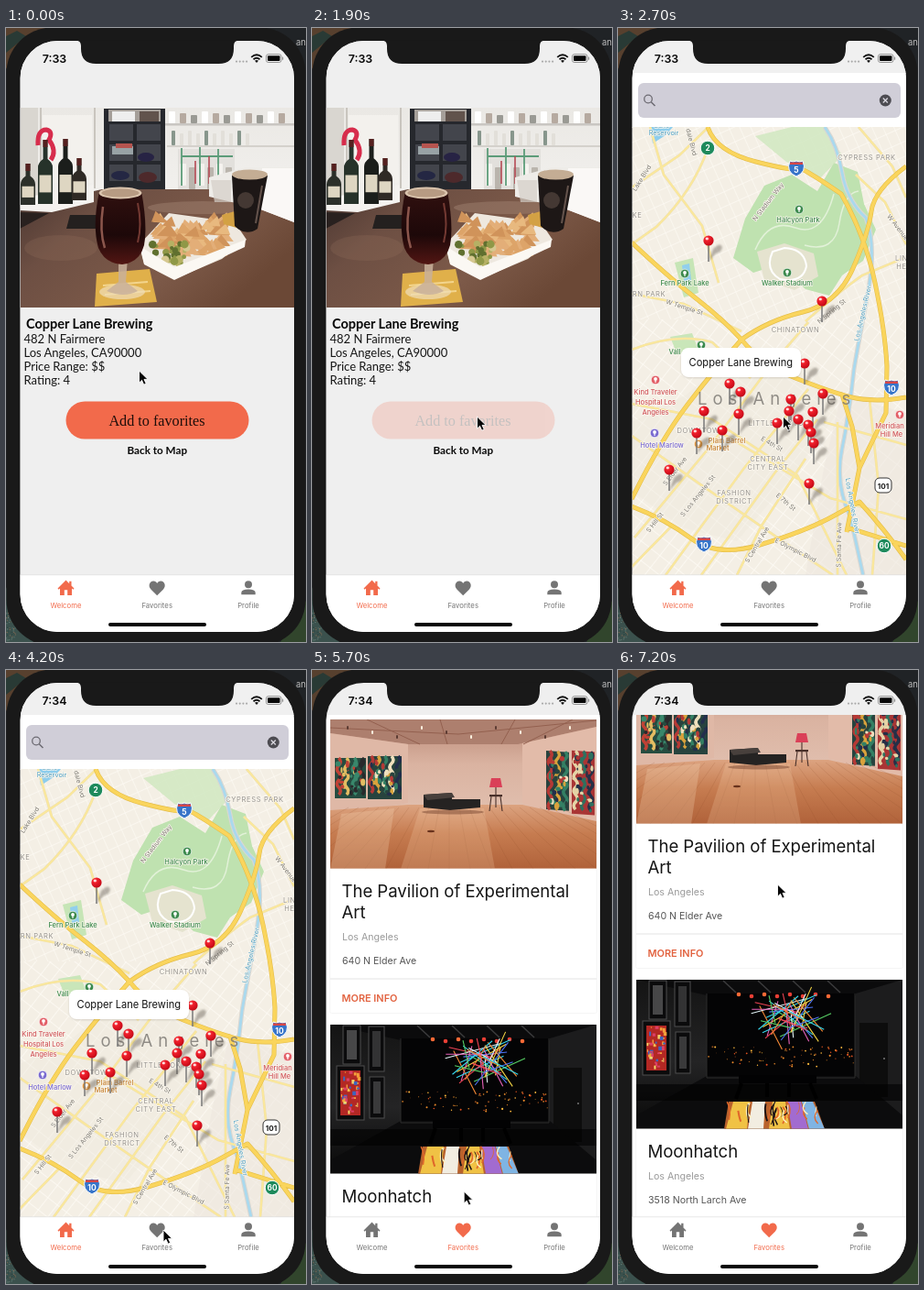
Write an HTML page that moves like this. It is 328 by 670 pixels and loops after 7300 ms.

```html
<!DOCTYPE html>
<html lang="en">
<head>
<meta charset="utf-8">
<title>City guide app</title>
<style>
html,body{margin:0;width:100%;height:100%;overflow:hidden;background:#1a1a1a}
svg{display:block;width:328px;height:670px;font-family:Inter,Roboto,sans-serif}
</style>
</head>
<body>
<script>
const LOOP = 7300, ORANGE = '#f26a4b', GREY = '#747474';

// markup helpers
const R = (x, y, w, h, f, rx = 0, o = '') => `<rect x="${x}" y="${y}" width="${w}" height="${h}" rx="${rx}" fill="${f}" ${o}/>`;
const C = (x, y, r, f, o = '') => `<circle cx="${x}" cy="${y}" r="${r}" fill="${f}" ${o}/>`;
const E = (x, y, a, b, f, o = '') => `<ellipse cx="${x}" cy="${y}" rx="${a}" ry="${b}" fill="${f}" ${o}/>`;
const P = (d, f, o = '') => `<path d="${d}" fill="${f}" ${o}/>`;
const S = (d, c, w = 1, o = '') => `<path d="${d}" fill="none" stroke="${c}" stroke-width="${w}" ${o}/>`;
const T = (s, x, y, z, f = '#111', o = '') => `<text x="${x}" y="${y}" font-size="${z}" fill="${f}" ${o}>${s}</text>`;
const G = (id, body, o = '') => `<g id="${id}" ${o}>${body}</g>`;
const many = (n, fn) => Array.from({length: n}, (_, i) => fn(i)).join('');
const grad = (id, stops, o = 'x2="0" y2="1"') => `<linearGradient id="${id}" ${o}>` +
  stops.map(([p, c]) => `<stop offset="${p}" stop-color="${c}"/>`).join('') + '</linearGradient>';
const clip = (id, body) => `<clipPath id="${id}">${body}</clipPath>`;
const MID = 'text-anchor="middle"';

let seed = 11;
const rnd = (a = 0, b = 1) => {
  seed = (seed * 16807) % 2147483647;
  return +(a + (b - a) * seed / 2147483647).toFixed(1);
};
const pick = list => list[Math.floor(rnd(0, 99.9) / 100 * list.length)];

const defs = '<defs>' +
  clip('screen', R(15.5, 14, 299.5, 645, '#000', 41)) +
  clip('body', R(15.5, 14, 299.5, 583, '#000')) +
  clip('list', R(15.5, 49, 299.5, 548, '#000')) +
  clip('photo', R(15.5, 87, 299.5, 218, '#000')) +
  clip('room', R(20, 54, 291, 162.5, '#000')) +
  clip('night', R(20, 387, 291, 162.5, '#000')) +
  clip('mapArea', R(15.5, 108, 299.5, 489, '#000')) +
  grad('table', [[0, '#4b3731'], [.3, '#6d4f43'], [.7, '#7d5a49'], [1, '#6b4836']], 'x2="1" y2=".5"') +
  grad('wall', [[0, '#eae8e4'], [1, '#fcfbfa']]) +
  grad('beer', [[0, '#30100f'], [.6, '#1d0809'], [1, '#521613']]) +
  grad('museum', [[0, '#b98876'], [.3, '#dab3a1'], [1, '#e9cdbe']]) +
  grad('floor', [[0, '#dca380'], [.45, '#c67c50'], [1, '#b0623a']]) +
  grad('dark', [[0, '#141414'], [.55, '#242425'], [1, '#080808']]) +
  '<radialGradient id="pinHead" cx=".35" cy=".3" r=".75"><stop offset="0" stop-color="#ff9a9a"/><stop offset=".3" stop-color="#f0202c"/><stop offset="1" stop-color="#c00714"/></radialGradient>' +
  '<filter id="soft"><feGaussianBlur stdDeviation="1.3"/></filter>' +
  '<pattern id="streets" width="13" height="17" patternUnits="userSpaceOnUse" patternTransform="rotate(38)">' +
  S('M0 0H13M0 0V17', '#fffdf8', 1.5) + '</pattern>' +
  '<pattern id="blocks" width="11" height="15" patternUnits="userSpaceOnUse" patternTransform="rotate(-24)">' +
  S('M0 0H11M0 0V15', '#fffdf8', 1.3) + '</pattern></defs>';

/* ---------- detail screen ---------- */
function bottle(x, y, h, c) {
  return P(`M${x - 2.5} ${y}h5v${h * .3}q5.500 4 5.500 9V${y + h}h-16V${y + h * .3 + 9}q0-5 5.500-9z`, c) +
    R(x - 6.5, y + h * .55, 13, h * .27, '#ded6c2') + R(x - 2.5, y, 5, 8, '#55201f');
}
function barPhoto() {
  let s = R(15, 87, 301, 218, 'url(#wall)');
  s += R(15, 87, 20, 100, '#d9d6d0') + S('M38 87V180M97 87V175', '#c9c5be', 2) + R(40, 95, 54, 74, '#f3f1ed') + R(170, 104, 145, 2.5, '#c9c6c2') + R(176, 128, 140, 2, '#d4d1cc');
  s += many(11, i => R(178 + i * 12, 91 + i % 3 * 2, 7, 13 - i % 3 * 2, ['#fff', '#b6aaa0', '#9a9a94'][i % 3], 1));
  s += many(10, i => R(181 + i * 9, 112 + i % 2 * 3, 4, 16 - i % 2 * 3, i % 4 ? '#e2dfd9' : '#87968c', 1));
  s += R(188, 132, 62, 44, '#e2e0dc') + many(6, i => R(190 + i * 10, 148 + i % 2 * 4, 7, 24, i % 2 ? '#bab5ad' : '#f4f2ee', 1));
  s += S('M192 172V131M212 172V130M232 172V132M192 140H248', '#5c9c79', 1.8) + S('M207 145v25M222 140v30', '#b54954', 1.6);
  // shelving unit
  s += R(107, 88, 67, 93, '#26282d') + many(6, i => R(113 + i % 2 * 30, 105 + (i >> 1) * 22, 26, 18, '#43454c')) +
    R(112, 89, 57, 13, '#a59f99') + R(116, 91, 25, 11, '#eee') + R(146, 91, 21, 11, '#61534c');
  s += R(116, 129, 23, 9, '#98a2a5') + R(120, 126, 18, 5, '#b5544f') + E(153, 141, 9, 5, '#272344') + E(125, 161, 10, 5, '#242743') + E(155, 163, 10, 6, '#4d292b');
  // counter
  s += P('M15 196L105 176H240L315 186V305H15z', 'url(#table)') + P('M222 163L262 152H315V212L276 197 222 184z', '#eeece8') +
    P('M280 153H315V212L276 197z', '#faf8f6');
  s += P('M15 201L47 202 15 219z', '#29211f') + P('M70 204L118 204 112 219 66 219z', '#24201f') + P('M15 186L96 171V190L50 201 15 199z', '#f4f2ef') + E(215, 196, 60, 7, '#a98a78', 'opacity=".4"') + E(60, 240, 40, 14, '#92705d', 'opacity=".25"');
  s += S('M35 128q-1-17 9-17 8 2 3 11 9 12 2 22', '#d72d4c', 5) + bottle(24, 148, 45, '#2c302a') + bottle(43, 122, 70, '#26322a') +
    bottle(65, 121, 71, '#1b1e1b') + bottle(80, 142, 46, '#2f2a25');
  // coaster and tall glass
  s += P('M99 268L157 263 165 299 97 304z', '#e0b04a') + S('M106 281L155 277M108 291L158 287', '#f3d58d', 2);
  s += E(127, 288, 25, 8, '#f0dfbb', 'opacity=".7"') + P('M123 251h10l-2 26 13 10q-15 8-34 0l13-10z', '#c9b19b', 'opacity=".85"');
  // tray of chips
  s += P('M146 236L178 202 250 212 263 231 236 252 184 274 151 257z', '#eee8df');
  s += many(60, i => {
    const x = rnd(168, 242), y = rnd(206, 244), a = rnd(7, 12);
    return P(`M${x - a} ${y + 5}L${x + rnd(-5, 5)} ${y - a * .7}L${x + a} ${y + 6}z`, pick(['#dda469', '#e8b97f', '#d0935a', '#e3ae78']));
  });
  s += many(34, () => C(rnd(160, 198), rnd(234, 258), rnd(2, 4.5), pick(['#8f9847', '#b6b164', '#60702f', '#d6c891'])));
  s += P('M146 238L184 261 262 231 261 239 184 275 151 258z', '#fbf8f3');
  s += P('M102 178Q94 216 101 240 108 257 127 258 146 256 151 237 155 216 148 178z', 'url(#beer)') +
    E(125, 180, 23.5, 6.5, '#dac4ad') + E(125, 180, 20.5, 4.5, '#b79b83') + S('M106 195Q102 222 108 240', '#8b564c', 2.5) + S('M144 191q5 24 0 43', '#733932', 2);
  // dark beer
  s += P('M236 204L250 200 252 218 238 214z', '#d3a144') + P('M224 166h22v24h-18z', '#d5cfc8', 'opacity=".7"') + P('M247 161L250 216Q262 228 275 219L286 161z', '#1d1716') +
    E(266.5, 160, 19.5, 5.5, '#c4ad94') + C(262, 188, 9, '#5e4f47', 'opacity=".6"') + S('M280 172L273 213', '#64534c', 2);
  return `<g clip-path="url(#photo)">${s}</g>`;
}
const lato = 'font-family="Lato,sans-serif"';
const detail = R(15, 14, 301, 584, '#efefef') + barPhoto() +
  T('Copper Lane Brewing', 22, 327.5, 14.5, '#0a0a0a', lato + ' font-weight="700"') +
  ['482 N Fairmere', 'Los Angeles, CA90000', 'Price Range: $$', 'Rating: 4'].map((s, i) => T(s, 19.5, 343.5 + i * 15, 13, '#161616', lato)).join('') +
  G('button', R(65.5, 407.5, 200, 41, ORANGE, 20.5) + T('Add to favorites', 165, 433.5, 16.2, '#1e0e0a', MID + ' font-family="Liberation Serif,serif"')) +
  T('Back to Map', 165.3, 465, 11.7, '#0a0a0a', MID + ' font-weight="700" ' + lato);

/* ---------- map screen ---------- */
const L = (s, x, y, z, c = '#8d8a84', r = 0, o = '') => T(s, 0, 0, z, c,
  `${MID} transform="translate(${x} ${y}) rotate(${r})" stroke="#faf6ee" stroke-width="1.6" paint-order="stroke" stroke-linejoin="round" ${o}`);
const area = (s, x, y) => L(s, x, y, 7.6, '#96938e', 0, 'letter-spacing=".6"');
const street = (s, x, y, r) => L(s, x, y, 7, '#7c7971', r);
const place = (s, x, y, c) => L(s, x, y, 7.5, c, 0, 'font-weight="500"');
const dot = (x, y, c) => C(x, y, 4.8, c, 'stroke="#fff" stroke-width=".7"') + C(x, y - 1, 1.9, '#fff') + R(x - .6, y, 1.2, 3, '#fff');
const interstate = (s, x, y) => P(`M${x - 7} ${y - 8}q3.5 2 7 0 3.5 2 7 0 5 12-7 17-12-5-7-17z`, '#3774c9', 'stroke="#fff"') +
  R(x - 7, y - 6.5, 14, 2.5, '#d64646') + T(s, x, y + 4.5, 8.5, '#fff', MID + ' font-weight="700"');
const route = (s, x, y) => C(x, y, 7.8, '#1e8a5c', 'stroke="#fff"') + T(s, x, y + 3, 8.3, '#fff', MID + ' font-weight="700"');

function cityMap() {
  let s = R(15, 108, 301, 490, '#f4efe5') + R(15, 108, 301, 210, 'url(#blocks)', 0, 'opacity=".8"') + R(15, 318, 301, 280, 'url(#streets)', 0, 'opacity=".9"');
  s += P('M15 430L75 400 140 345 215 370 240 420 190 490 130 560 70 545 15 505z', '#ebe5da', 'opacity=".4"') +
    P('M244 400L315 420V597H205L225 480z', '#eee8df', 'opacity=".6"');
  // parks
  s += P('M160 172L190 160 218 178 236 147 262 157 269 192 282 220 268 254 245 270 231 292 205 285 176 258 148 267 126 251 139 208z', '#bfe2b0') +
    P('M150 118L190 108H226L245 139 220 165 184 146z', '#cfe8bf', 'opacity=".8"') + P('M152 244L182 235 214 246 219 271 193 286 160 275z', '#e5e3cf') +
    S('M169 244q-9 20 8 30 25 5 29-14-2-19-24-20z', '#fff', 2) + S('M150 242Q165 207 194 218T236 181M204 237Q237 246 242 213T263 178', '#e2f1d8', 1.5);
  s += P('M62 256L82 251 88 289 72 294z', '#c6e5b6') + P('M70 259L78 257 80 275 73 282z', '#91cfed') + P('M35 108H60L52 117 38 126z', '#8dcdec') + P('M57 337L81 333 87 349 65 357z', '#c9e6b9');
  // river
  const river = 'M226 108Q240 128 245 158T271 207Q283 237 273 290T258 372Q253 420 245 459T254 533L268 597';
  s += S(river, '#d9d7d2', 5) + S(river, '#a9d9ee', 2.8);
  // roads
  const thin = 'M15 290L72 301 135 331M15 351Q64 332 103 343L145 382M15 174L67 139 99 108M98 132Q82 178 42 217L15 236M35 108L50 160 92 216 110 278M15 410L103 427 196 488 250 597M18 556L98 460 165 371 208 321M52 597L138 480 208 394M91 597L171 486 218 427M15 445L90 498 180 560 235 597M110 440L232 513 315 536M240 430V597M275 405L285 500 278 597M205 320Q245 285 267 270L315 250M260 160L292 190 315 236M263 108L300 151 315 185M225 430L315 455M15 588L60 542M130 597L157 543 205 470';
  s += S(thin, '#eedfaf', 2.8) + S(thin, '#fbe89b', 1.8);
  const main = 'M15 234Q53 270 84 294T135 340Q158 368 194 382T245 400Q274 410 315 403M15 514Q47 449 76 411T135 340Q164 319 202 310T257 262 277 200 315 151M98 108Q107 135 151 146T196 153 244 181Q270 226 281 278T294 369L293 420 264 480 250 550M15 522Q52 536 80 557T155 564 231 535L264 517Q292 548 315 580M250 545L315 565M245 400L256 435 264 480';
  s += S(main, '#e4bd49', 5, 'stroke-linejoin="round"') + S(main, '#fad55d', 3.8, 'stroke-linejoin="round"');
  // labels
  const green = '#3c8a4d', blue = '#4d9fc4', red = '#d0575c', brown = '#c68231';
  s += L('Lake', 48, 109, 7.3, blue) + L('Reservoir', 50, 117, 7.3, blue);
  s += area('CYPRESS PARK', 272, 144) + area('RN PARK', 34, 293) + area('KE', 21, 207) + area('CHINATOWN', 194, 332) + area('LIN', 310, 254) + area('HE', 310, 263);
  s += area('DOWNTOWN', 91, 442) + area('LITTLE TOKYO', 173, 434) + area('CENTRAL', 164, 473) + area('CITY EAST', 164, 482) + area('FASHION', 127, 510) + area('DISTRICT', 127, 519);
  s += street('N Stadium Way', 166, 191, -52) + street('W Temple St', 72, 307, 18) + street('N Spring St', 235, 311, -40) + street('dale Blvd', 78, 125, 76);
  s += street('Lake Blvd', 28, 165, -58) + street('W Avenue', 304, 219, 52) + street('E 4th St', 167, 456, 30) + street('E 7th St', 182, 519, 40);
  s += street('S Elder Ave', 64, 485, -52) + street('S Los Angeles St', 89, 512, -51) + street('S Hill St', 42, 541, -52);
  s += street('S Central Ave', 154, 565, -59) + street('E Olympic Blvd', 193, 572, 27) + street('S Santa Fe Ave', 244, 564, -89);
  s += L('Los Angeles River', 270, 312, 7.3, blue, -77) + L('Los Angeles River', 254, 522, 7.3, blue, 80);
  s += place('Halcyon Park', 197, 212, green) + place('Fern Park Lake', 73, 281, green) + place('Walker Stadium', 185, 281, green) + place('Vall', 62, 356, green);
  s += ['Kind Traveler', 'Hospital Los', 'Angeles'].map((w, i) => place(w, 41, 400 + i * 11, red)).join('');
  s += place('Hotel Marlow', 48, 458, '#7a6bd0') + place('Plain Barrel', 119, 453, brown) + place('Market', 109, 461, brown) + place('Meridian', 297, 437, red) + place('Hill Me', 299, 446, red);
  s += dot(198, 198, green) + dot(73, 268, green) + dot(185, 267, green) + dot(91, 346, green) + dot(41, 384, '#e25f67') + dot(40, 442, '#7a6bd0') + dot(88, 454, '#e3973d') + dot(308, 422, '#e25f67');
  s += route('2', 98, 131) + route('60', 291, 565) + interstate('5', 195, 153) + interstate('10', 299, 392) + interstate('10', 94, 563) +
    R(281, 491, 18, 16, '#fff', 5, 'stroke="#333"') + T('101', 290, 502.5, 8.2, '#222', MID + ' font-weight="700"');
  s += T('Los Angeles', 87, 411, 18.5, '#77746f', 'letter-spacing="6" opacity=".8"');
  // pins
  const pins = [[99, 232], [223, 298], [204, 366], [122, 388], [134, 397], [224, 399], [189, 405], [94, 418], [187, 418], [213, 419], [132, 421], [197, 427],
    [174, 431], [208, 433], [114, 439], [211, 441], [86, 442], [214, 453], [56, 482], [209, 497]];
  s += pins.map(([x, y]) => P(`M${x} ${y + 23}L${x + 5} ${y + 9}q8-8 10-2-1 6-7 7z`, '#554d45', 'opacity=".4" filter="url(#soft)"') +
    S(`M${x} ${y + 4}V${y + 23}`, '#777', 1.5) + C(x, y, 5.6, 'url(#pinHead)') + E(x - 1.7, y - 2, 1.6, 1.2, '#fff', 'opacity=".75"')).join('');
  s += R(69, 350, 131, 32, '#6d6458', 8, 'opacity=".22" filter="url(#soft)"') + R(69, 349, 131, 32, '#fff', 8) + T('Copper Lane Brewing', 134.3, 369, 11.1, '#111', MID);
  return `<g clip-path="url(#mapArea)">${s}</g>`;
}
const mapPage = R(15, 14, 301, 36, '#f0f0f0') + R(15, 49, 301, 60, '#fff') + R(22, 60, 287, 38, '#d0ced8', 6) +
  `<circle cx="33" cy="77.5" r="4.3" fill="none" stroke="#6d6b73" stroke-width="1.3"/>` + S('M36.2 80.8L40.5 85', '#6d6b73', 1.5) +
  C(292.3, 79, 6.5, '#4d4c52') + S('M289.8 76.5l5 5m0-5l-5 5', '#d9d7df', 1.3) + cityMap();

/* ---------- favorites screen ---------- */
// hanging cloth: wavy stripes broken up by loose patches
function textile(x, y, w, h, list) {
  const n = Math.round(w / 8);
  return R(x, y, w, h, list[0]) + many(n, i => {
    const X = x + (i + .5) * w / n;
    let d = `M${X} ${y}q4 4 0 8`;
    for (let k = 16; k <= h; k += 8) d += 't0 8';
    return S(d, list[1 + i % (list.length - 1)], 3.5);
  }) + many(Math.round(w * h / 45), () => E(rnd(x + 3, x + w - 3), rnd(y + 4, y + h - 4), rnd(1, 3), rnd(1.5, 4), pick(list)));
}
function galleryPhoto() {
  let s = R(20, 54, 291, 163, 'url(#museum)') + P('M20 54H311V62L225 81H105L20 69z', '#ad7f6e') + P('M20 69L105 81V145L20 160z', '#dfb8a6') + P('M230 80L311 62V175L230 145z', '#e2bba9');
  s += S('M20 63L160 70 311 55M60 54L118 81M140 54L148 81M222 54L207 81M285 54L231 81', '#93604f', 1);
  s += many(10, i => R(38 + i * 27, 61 + i % 3 * 5, 2, 4, i % 2 ? '#fff2df' : '#5c3b32', 1));
  s += P('M20 153L105 147H230L311 165V217H20z', 'url(#floor)') + many(22, i => S(`M${40 + i * 11} 150L${-80 + i * 23} 217`, '#8e4a29', .5, 'opacity=".35"'));
  s += P('M118 151L188 151 200 217H97z', '#f6cfad', 'opacity=".22"') + P('M32 157L90 151 80 217H20z', '#f8d9bd', 'opacity=".25"');
  const hues = ['#27433e', '#b53935', '#d9a23c', '#348064', '#efe0bd', '#232e4c'];
  s += textile(25, 96, 34, 44, ['#264c40', '#c04135', '#e3bc62', '#39876b', '#2a2a2c']) + textile(61, 94, 37, 47, hues) +
    `<g transform="translate(0 -18) skewY(4)">${textile(256, 88, 25, 64, hues)}${textile(284, 86, 25, 69, ['#a93535', '#e5d4a6', '#2e715f', '#253047'])}</g>`;
  s += P('M122 136L153 134V141H184V150L151 153 122 150z', '#252322') + P('M122 136L153 134 156 139 126 142z', '#48403c') + E(154, 155, 34, 2.5, '#6e3d28', 'opacity=".45"');
  s += P('M196 118h10l2 10h-14z', '#da4058') + S('M201 128v9', '#563d36', 1.2) + R(194, 136, 14, 2.2, '#49302a') + S('M196 138l-2 16M206 138l2 16M201 138v12', '#49302a', 1.1);
  s += E(130, 176, 4, 1.2, '#69331d');
  return `<g clip-path="url(#room)">${s}</g>`;
}
function neonPhoto() {
  let s = R(20, 387, 291, 163, 'url(#dark)') + P('M20 387H311L262 404H97z', '#0b0b0c') + P('M97 402H259V494H97z', '#040405') + P('M260 402L311 387V549L260 506z', '#1c1c1d');
  s += R(264, 434, 31, 81, '#0d0d0d') + C(291, 473, 1, '#777') + P('M20 535L97 492H260L311 535V549H20z', '#0c0c0d') + S('M97 402V494H259V402', '#2c2c2d', 1);
  const frame = (x, y, w, h, c) => R(x, y, w, h, '#0b0b0c', 0, 'stroke="#4e4e4f"') + R(x + 4, y + 5, w - 8, h - 10, c);
  s += frame(34, 388, 19, 42, '#474748') + frame(62, 389, 17, 49, '#333334') + frame(27, 432, 30, 59, '#b32824') + frame(63, 444, 16, 45, '#3a3a3b');
  s += many(40, () => R(rnd(31, 50), rnd(437, 482), rnd(1, 4), rnd(1, 5), pick(['#f3a03b', '#dc3f68', '#3f64bd', '#f4d669'])));
  s += many(75, () => C(rnd(99, 258), rnd(460, 482), rnd(.4, 1.1), pick(['#eb8a29', '#ffb83d', '#e45120', '#8d4a1c'])));
  s += many(8, i => C(132 + i * 14, 403 + i % 2 * 2, 2.3, pick(['#ff6a36', '#ffb451', '#e93f35']))) + many(4, i => S(`M${115 + i * 38} 388l14 13`, '#3b3b3c', 1.5));
  const neon = ['#36d6ec', '#ef4455', '#f2d344', '#56cf65', '#4d73f2', '#e862bb', '#f58a36', '#e3f4f7'];
  s += many(34, i => {
    const x = rnd(166, 208), y = rnd(412, 442), a = rnd(0, 3.1), r = rnd(16, 36), c = Math.cos(a) * r, v = Math.sin(a) * r * .75;
    return S(`M${x - c} ${y - v}L${x + c} ${y + v}`, neon[i % 8], 1.1);
  });
  s += R(132, 491, 85, 9, '#020203') + R(20, 501, 291, 18, '#000', 0, 'opacity=".6"') + S('M135 500l-6 17M210 500l7 17M163 500v15M187 500v15', '#000', 4);
  // reflections on the floor
  s += P('M121 520H215L226 550H116z', '#b9622c') + P('M126 520h18l-3 30h-23zM169 520h14l5 30h-23z', '#f0c245') + P('M147 520h14l-2 30h-17z', '#f2ede1') +
    P('M185 520h15l8 30h-18z', '#a26bd0') + P('M201 520h12l13 30h-17z', '#7fb4e3');
  s += many(26, () => {
    const x = rnd(119, 219);
    return S(`M${x} ${rnd(519, 530)}q${rnd(-7, 7)} 8 ${rnd(-3, 3)} ${rnd(8, 20)}`, pick(['#1b1114', '#1b1114', '#e0672a', '#fff0c0']), rnd(.8, 2.2));
  });
  return `<g clip-path="url(#night)">${s}</g>`;
}
const line = (s, y, c) => T(s, 33, y, 10.6, c);
const title = (s, y) => T(s, 32.5, y, 18.6, '#151515', 'letter-spacing="-.05"');
const card = (y, h) => R(19.5, y, 292, h, '#fff', 2, 'stroke="#f5f5f5"');
const cards = R(15, 49, 301, 700, '#fff') + card(53.5, 321) + galleryPhoto() +
  title('The Pavilion of Experimental', 248) + title('Art', 271) + line('Los Angeles', 295, '#9a9a9a') + line('640 N Elder Ave', 321, '#555') +
  R(20, 336.5, 291, 1, '#e3e3e3') + T('MORE INFO', 32.5, 362, 10.9, '#e2623f', 'font-weight="600"') +
  card(386.5, 300) + neonPhoto() +
  title('Moonhatch', 581) + line('Los Angeles', 605, '#9a9a9a') + line('3518 North Larch Ave', 631, '#555');

/* ---------- tab bar, status bar, device ---------- */
const tab = (id, name, x, icon) => G(id, P(icon, 'currentColor', `transform="translate(${x} 611)"`) + T(name, x, 633, 7.7, 'currentColor', MID + ' letter-spacing=".05"'));
const tabs = R(15, 597, 301, 63, '#fff') + R(15, 596.5, 301, .7, '#dedede') +
  tab('home', 'Welcome', 65.5, 'M0-8.5L3.7-4.8V-7.3H6V-2.5L9 .6 7.9 1.8 6.5.5V8H1.7V2.3H-1.7V8H-6.5V.5L-7.9 1.8-9 .6z') +
  tab('heart', 'Favorites', 165.2, 'M0 8.2L-6.6 1.7C-11-3-7-8-3.9-7.5-2-7.5-.7-6.3 0-5 .7-6.3 2-7.5 3.9-7.5 7-8 11-3 6.6 1.7z') +
  tab('person', 'Profile', 265, 'M0-7.8a4 4 0 0 1 0 8 4 4 0 0 1 0-8zM-7.7 7.2V5Q-7.5 1.4 0 1.4T7.7 5V7.2z') +
  R(112, 649, 107, 4, '#050505', 2);
const status = T('7:33', 53, 37.5, 12.4, '#090909', MID + ' id="clock" font-weight="600"') +
  many(4, i => C(252 + i * 3.7, 36.6, 1.1, '#aaa')) + S('M268.2 31.8q5.8-5.2 11.6 0M270.5 34.2q3.5-3 7 0', '#111', 1.8) + P('M272 35.8q2-1.5 4 0l-2 2.2z', '#111') +
  R(284.5, 28.7, 16.5, 8.8, 'none', 2.3, 'stroke="#888" stroke-width=".9"') + R(286, 30.2, 13.5, 5.8, '#080808', 1) + R(302, 31.5, 1.2, 3.3, '#999', .6);
const desktop = R(0, 0, 328, 670, '#202326') + P('M0 0H46L17 12 0 45z', '#57402e') + P('M0 9L12 3 22 9 0 27z', '#293a35') + P('M0 610L30 670H0z', '#3b514d') + P('M328 625V670H300z', '#31452c') +
  T('an', 317, 18.5, 9.5, '#bbb') + many(50, () => R(rnd(0, 10), rnd(635, 669), 1, 1, pick(['#69837c', '#263f3d', '#8c6e56'])));
const bezel = R(.5, -.5, 327, 674.5, '#191919', 50);
const notch = P('M76 13.5q6 0 6 6v3q0 16.5 16.5 16.5h134q16.500 0 16.500-16.500v-3q0-6 6-6z', '#191919');

document.body.innerHTML = `<svg viewBox="0 0 328 670" xmlns="http://www.w3.org/2000/svg">${defs}${desktop}${bezel}<g clip-path="url(#screen)">` +
  R(15, 14, 301, 646, '#efefef') +
  `<g clip-path="url(#body)">${G('map', mapPage)}${G('detail', detail)}</g>` +
  `<g clip-path="url(#list)">${G('cards', cards)}</g>${tabs}${status}</g>${notch}` +
  G('cursor', P('M0 0V13.2L3 10.3 5.2 15.200 7.700 14.100 5.500 9.400H9.600z', '#050505', 'stroke="#fff" stroke-width=".9"')) + '</svg>';

/* ---------- motion ---------- */
const $ = id => document.getElementById(id);
const part = (t, a, b) => Math.min(1, Math.max(0, (t - a) / (b - a)));
const smooth = p => p * p * (3 - 2 * p);
const show = (id, on) => $(id).setAttribute('display', on ? 'inline' : 'none');
const shift = (id, x, y) => $(id).setAttribute('transform', `translate(${x} ${y})`);

// cursor moves: start, end, x, y
const moves = [[400, 1200, 180.5, 424], [3200, 4200, 172, 611], [4400, 4800, 168.7, 611], [5500, 6250, 154.5, 373], [6350, 6800, 174.5, 283]];

function draw(t) {
  let x = 145.5, y = 374;
  for (const [a, b, X, Y] of moves) {
    const p = smooth(part(t, a, b));
    x += (X - x) * p;
    y += (Y - y) * p;
  }
  const drag = 49 * part(t, 6900, 7200);
  shift('cursor', x, y - drag);
  shift('cards', 0, -drag);

  const press = smooth(part(t, 1650, 1880)) - smooth(part(t, 2100, 2300));
  $('button').setAttribute('opacity', 1 - .8 * press);
  const pop = 1 - Math.pow(1 - part(t, 2180, 2650), 3);
  shift('detail', 300 * pop, 0);
  shift('map', -90 * (1 - pop), 0);

  const fav = t >= 5000;
  show('detail', t < 2650);
  show('map', t >= 2100 && !fav);
  show('cards', t >= 5500);
  $('home').setAttribute('color', fav ? GREY : ORANGE);
  $('heart').setAttribute('color', fav ? ORANGE : GREY);
  $('person').setAttribute('color', GREY);
  $('clock').textContent = t < 3200 ? '7:33' : '7:34';
}
const start = performance.now();
function tick() {
  draw((performance.now() - start) % LOOP);
  requestAnimationFrame(tick);
}
tick();
</script>
</body>
</html>
```
